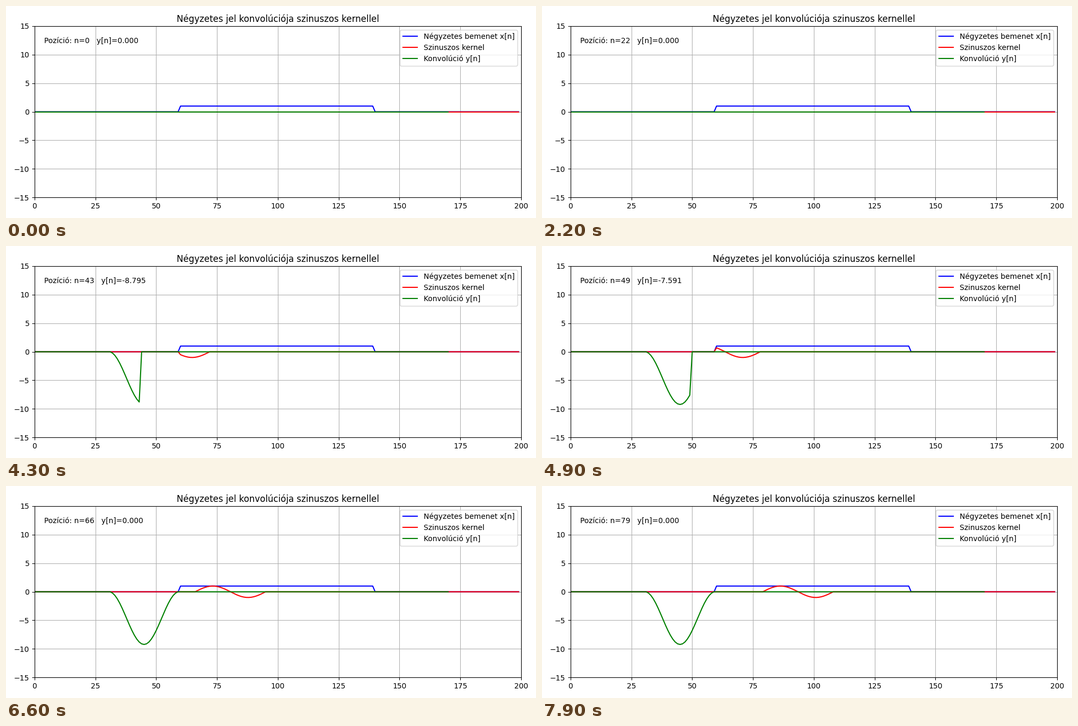
A matplotlib script that plays this animation: 1000x400 px, repeating every 8 s.

```python
import numpy as np
import matplotlib.pyplot as plt
from matplotlib.animation import FuncAnimation

N, M = 200, 30
FRAMES, STEP_MS = 80, 100

t = np.arange(N)
signal = np.where((t >= 60) & (t < 140), 1.0, 0.0)
kernel = np.sin(np.linspace(0, 2 * np.pi, M))


def product(n):
    """Kernel placed at n, weighted by the signal under it."""
    return signal[n:n + M] * kernel


response = np.array([product(n).sum() for n in range(N - M + 1)])
response[59:FRAMES] = 0.0  # whole period under the plateau: exact cancellation

fig, ax = plt.subplots(figsize=(10, 4), dpi=100)
ax.plot(t, signal, color="blue", label="Négyzetes bemenet x[n]")
kernel_line, = ax.plot(t, np.zeros(N), color="red", label="Szinuszos kernel")
out_line, = ax.plot(np.arange(N - M + 1), np.zeros(N - M + 1), color="green",
                    label="Konvolúció y[n]")
label = ax.text(0.02, 0.9, "", transform=ax.transAxes)
ax.set_xlim(0, N)
ax.set_ylim(-15, 15)
ax.set_title("Négyzetes jel konvolúciója szinuszos kernellel")
ax.legend(loc="upper right")
ax.grid(True)
fig.tight_layout()


def update(n):
    placed = np.zeros(N)
    placed[n:n + M] = product(n)
    kernel_line.set_ydata(placed)
    out_line.set_ydata(np.where(np.arange(N - M + 1) <= n, response, 0.0))
    label.set_text(f"Pozíció: n={n}   y[n]={response[n]:.3f}")
    return kernel_line, out_line, label


anim = FuncAnimation(fig, update, frames=FRAMES, interval=STEP_MS,
                     init_func=lambda: update(0), repeat=True, repeat_delay=0)
plt.show()
```
